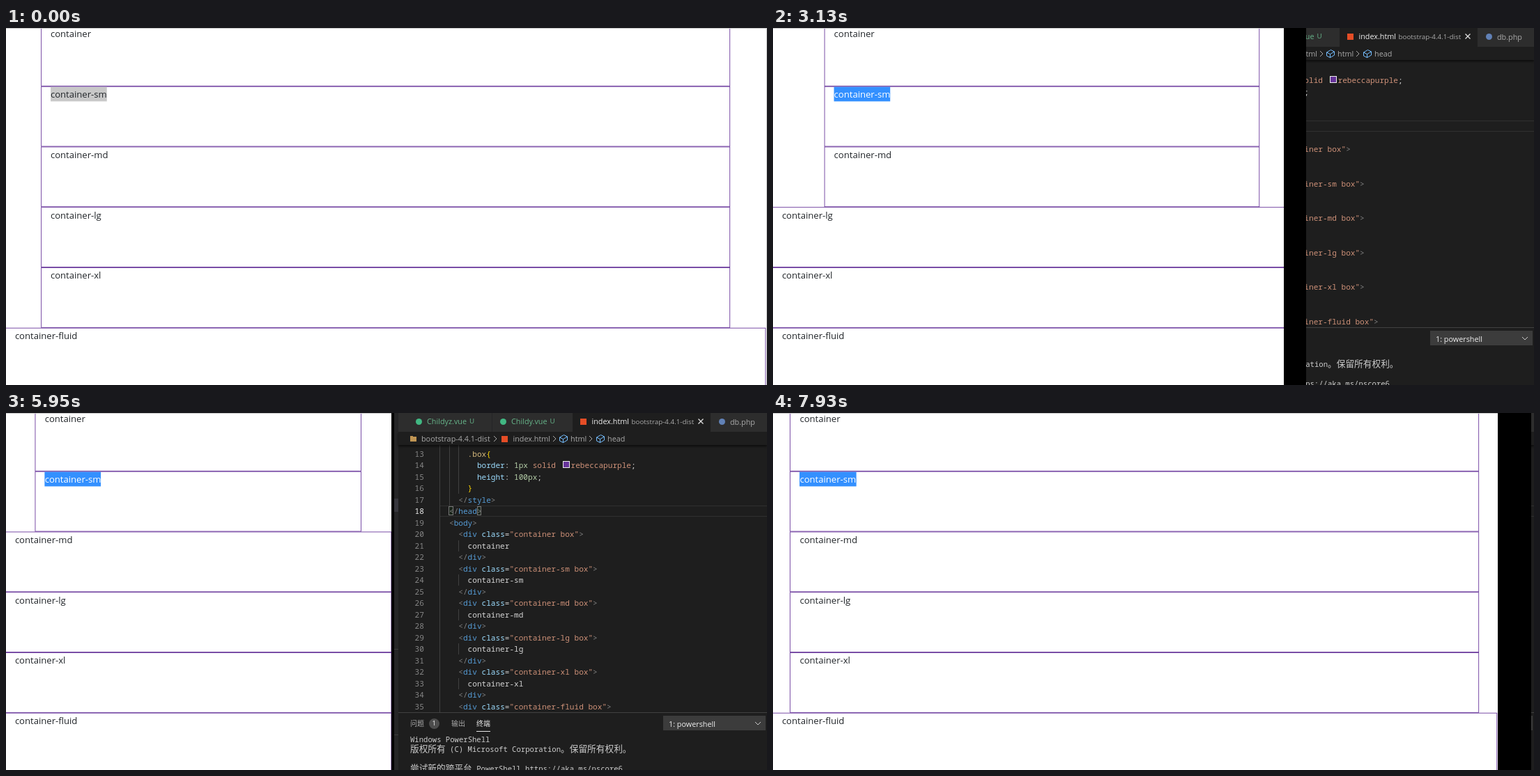
These frames come from a looping animation (1092x513 px, 7990 ms). An HTML page:

```html
<!DOCTYPE html>
<html lang="en">
<head>
<meta charset="utf-8">
<title>Responsive containers</title>
<style>
html, body { margin: 0; width: 100%; height: 100%; overflow: hidden; background: #1e1e1e; }
#stage { position: absolute; left: 0; top: 0; width: 1092px; height: 513px; overflow: hidden; }
#stage div, #stage svg { position: absolute; }

/* browser window */
#gap { top: 0; left: 0; height: 513px; background: #000; }
#page {
  top: 0; left: 0; height: 513px; overflow: hidden;
  background: linear-gradient(#c4c4c4, #c4c4c4) 1091px 0 / 1px 100% no-repeat #fff;
}
#page::after { content: ""; position: absolute; inset: 0 0 auto; height: 1px; background: #c8c8c8; }
#stage #doc {
  left: -1px; top: -2.75px; transform: scale(.8675); transform-origin: 0 0;
  font: 15.1px "Open Sans", sans-serif; color: #212529;
}
#doc p {
  box-sizing: border-box; height: 100px; margin: 0 auto; padding: 0 15px;
  border: 1px solid #639;
}
#doc span { display: inline-block; height: 24px; line-height: 25.6px; vertical-align: top; }
#doc .sel { background: #c8c8c8; }
#doc .sel.on { background: #3390ff; color: #fff; }

/* editor */
#editor { inset: 0; background: #1e1e1e; }
.t { white-space: pre; line-height: 16px; }
.ui { font-family: "Open Sans", "Noto Sans CJK SC", sans-serif; font-size: 10.8px; color: #a9a9a9; }
.small { font-size: 9.8px; }
.zh { font-size: 10px; }
.code { font-family: "Noto Sans Mono", monospace; font-size: 11.08px; color: #d4d4d4; }
.term { font-family: "Noto Sans Mono", "Noto Sans CJK SC", monospace; font-size: 10.6px; color: #ccc; }
.term b { font: 12.7px/1 "Noto Sans CJK SC", sans-serif; }
.num { color: #858585; }
.lit { color: #eee; }
.git { color: #67b58a; }
.p { color: #808080; } .g { color: #569cd6; } .a { color: #9cdcfe; }
.s { color: #ce9178; } .k { color: #d7ba7d; } .n { color: #b5cea8; } .y { color: #ffd700; }
.swatch {
  display: inline-block; box-sizing: border-box; width: 10px; height: 10px;
  margin: 0 2px 0 3px; border: 1px solid #eee; background: #639;
}
</style>
</head>
<body>
<div id="stage">
  <div id="editor"></div>
  <div id="gap"></div>
  <div id="page"><div id="doc"></div></div>
</div>
<script>
const $ = id => document.getElementById(id);
const editor = $('editor');
const add = html => editor.insertAdjacentHTML('beforeend', html);
const rect = (x, y, w, h, color, more = '') =>
  add(`<div style="left:${x}px;top:${y}px;width:${w}px;height:${h}px;background:${color};${more}"></div>`);
const put = (x, y, html, cls) =>
  add(`<div class="t ${cls}" style="left:${x}px;top:${y - 8}px">${html}</div>`);
const tok = (cls, text) => `<span class="${cls}">${text}</span>`;

// side bar
rect(0, 0, 563, 513, '#252526');
rect(0, 123, 563, 19, '#37373d');
[339, 462].forEach(y => rect(0, y, 563, 1, '#3c3c3c'));
[56, 170, 266, 285, 304, 323].forEach(y => rect(541, y - 3.5, 7, 7, '#6f6355', 'border-radius:50%'));
[536, 540, 544].forEach(x => rect(x - 1, 11, 2, 2, '#c5c5c5', 'border-radius:50%'));

// code
const tag = (name, cls) => tok('p', '&lt;') + tok('g', name) +
  (cls ? ' ' + tok('a', 'class') + '=' + tok('s', `"${cls}"`) : '') + tok('p', '&gt;');
const end = name => tok('p', '&lt;/') + tok('g', name) + tok('p', '&gt;');
const kinds = ['', '-sm', '-md', '-lg', '-xl', '-fluid'].map(k => 'container' + k);
const lines = [
  [4, tok('k', '.box') + tok('y', '{')],
  [6, tok('a', 'border') + ': ' + tok('n', '1px') + ' ' + tok('s', 'solid') + ' ' +
      '<i class="swatch"></i>' + tok('s', 'rebeccapurple') + ';'],
  [6, tok('a', 'height') + ': ' + tok('n', '100px') + ';'],
  [4, tok('y', '}')],
  [2, end('style')],
  [0, end('head')],
  [0, tag('body')]
];
kinds.forEach(k => lines.push([2, tag('div', k + ' box')], [4, k], [2, end('div')]));

const CH = 6.65, LEFT = 636;
rect(622, 46, 1, 384, '#404040');
rect(636, 46, 1, 87, '#404040');
rect(649, 46, 1, 70, '#404040');
rect(623, 133, 469, 1, '#303030');
rect(623, 148, 469, 1, '#303030');
[[635, 7], [676, 6]].forEach(([x, w]) =>
  rect(x, 134, w, 13, 'rgba(0,100,0,.1)', 'box-sizing:border-box;border:1px solid #777'));
lines.slice(0, 23).forEach(([indent, html], i) => {
  const y = 58.5 + i * 16.5;
  put(586.5, y, i + 13, 'code ' + (i === 5 ? 'lit' : 'num'));
  put(LEFT + indent * CH, y, html, 'code');
  if (i > 6 && indent === 4) rect(649, y - 8, 1, 16, '#404040');
});

// tabs and breadcrumb
rect(563, 27, 529, 19, '#1e1e1e', 'box-shadow:0 2px 3px #0009');
rect(563, 0, 529, 27, '#2d2d2d');
rect(813, 0, 198, 27, '#1e1e1e');
rect(697, 0, 1, 27, '#252526');
put(604, 12, 'Childyz.vue', 'ui git');
put(665, 12, 'U', 'ui git small');
put(725, 12, 'Childy.vue', 'ui git');
put(780.5, 12, 'U', 'ui git small');
put(840.5, 12, 'index.html', 'ui lit');
put(897.5, 12.5, 'bootstrap-4.4.1-dist', 'ui small');
put(1039, 12.5, 'db.php', 'ui');
put(596, 37, 'bootstrap-4.4.1-dist', 'ui');
put(727.5, 37, 'index.html', 'ui');
put(810, 37, 'html', 'ui');
put(863, 37, 'head', 'ui');
[592, 713].forEach(x => rect(x - 4.5, 7.5, 9, 9, '#41b883', 'border-radius:50%'));
rect(824, 7.5, 9, 9, '#e44d26');
rect(711, 32.5, 9, 9, '#e44d26');
rect(1022.5, 8, 9, 9, '#6181b6', 'border-radius:50%');
rect(580, 34, 9, 7, '#c09553');
rect(580, 32.5, 4, 2, '#c09553');

// panel
rect(563, 430, 529, 83, '#1e1e1e');
rect(563, 430, 529, 1, '#414141');
put(580, 446, '问题', 'ui zh');
rect(606.5, 438.5, 15, 15, '#4d4d4d', 'border-radius:50%');
put(611.5, 446, '1', 'ui lit small');
put(639, 446, '输出', 'ui zh');
put(675, 446, '终端', 'ui zh lit');
rect(675, 457, 20, 1, '#e7e7e7');
rect(943, 435, 147, 21, '#3c3c3c');
put(951, 446.5, '1: powershell', 'ui lit');
put(580, 469, 'Windows PowerShell', 'term');
put(580, 483, '<b>版权所有</b> (C) Microsoft Corporation<b>。保留所有权利。</b>', 'term');
put(580, 511, '<b>尝试新的跨平台</b> PowerShell https://aka.ms/pscore6', 'term');

// line icons
const cube = x => `<path stroke="#75beff" d="M${x - 5.5} 35l6-3.5 5 2.5v5l-6 3.5-5-2.5zl5 2.500 6-3.500m-6 3.500v5"/>`;
const chevron = x => `<path d="M${x - 2} 33l4 4-4 4"/>`;
add(`<svg width="1092" height="513" fill="none" stroke="#a9a9a9">
  ${[702, 787, 839].map(chevron).join('')}${[800, 853].map(cube).join('')}
  <path stroke="#e0e0e0" stroke-width="1.3" d="M993.500 8.500l7 7m0-7l-7 7"/>
  <path stroke="#ccc" d="M1075 444l4 4 4-4"/></svg>`);

// page content
const SCALE = .8675;
const tiers = [[576, 540], [768, 720], [992, 960], [1200, 1140]];
const doc = $('doc');
doc.innerHTML = kinds.map(k => `<p><span>${k}</span></p>`).join('');
const boxes = [...doc.children];
const picked = boxes[1].firstChild;
picked.className = 'sel';
const starts = [576, 576, 768, 992, 1200, Infinity];

// time, visible edge, layout edge, editor edge
const keys = [
  [0, 1092, 1090, 1092], [915, 1092, 1090, 1092], [1740, 1014, 1030, 1020],
  [2090, 945, 964, 948], [2580, 866, 889, 880], [3130, 733, 773, 765],
  [3370, 645, 690, 660], [3435, 645, 690, 660], [3880, 526, 561, 544],
  [4270, 480, 484, 480], [4550, 463, 465, 463], [4665, 463, 465, 463],
  [4950, 450, 452, 450], [5405, 450, 452, 450], [6240, 616, 614, 622],
  [6760, 761, 760, 770], [7030, 862, 860, 870], [7870, 1040, 1039, 1042],
  [7930, 1040, 1039, 1088], [7990, 1040, 1039, 1088]
];
const LOOP = 7990, STEP = 65;

function edges(t) {
  const i = keys.findIndex((k, n) => t < keys[n + 1][0]);
  const a = keys[i], b = keys[i + 1];
  const f = Math.floor((t - a[0]) / STEP) * STEP / (b[0] - a[0]);
  return [1, 2, 3].map(c => Math.round(a[c] + (b[c] - a[c]) * f));
}

function draw(now) {
  const t = now % LOOP;
  const [seen, laid, edge] = edges(t);
  const width = (laid + 1) / SCALE;
  const view = width + 5; // the viewport is a little wider than the content
  const cap = tiers.reduce((w, [from, max]) => view >= from ? max : w, 0);
  $('page').style.width = seen + 'px';
  $('gap').style.width = edge + 'px';
  doc.style.width = width + 'px';
  boxes.forEach((box, i) => { box.style.width = view >= starts[i] ? cap + 'px' : 'auto'; });
  picked.classList.toggle('on', t >= 840);
}

const began = performance.now();
function tick() {
  draw(performance.now() - began);
  requestAnimationFrame(tick);
}
tick();
</script>
</body>
</html>
```
